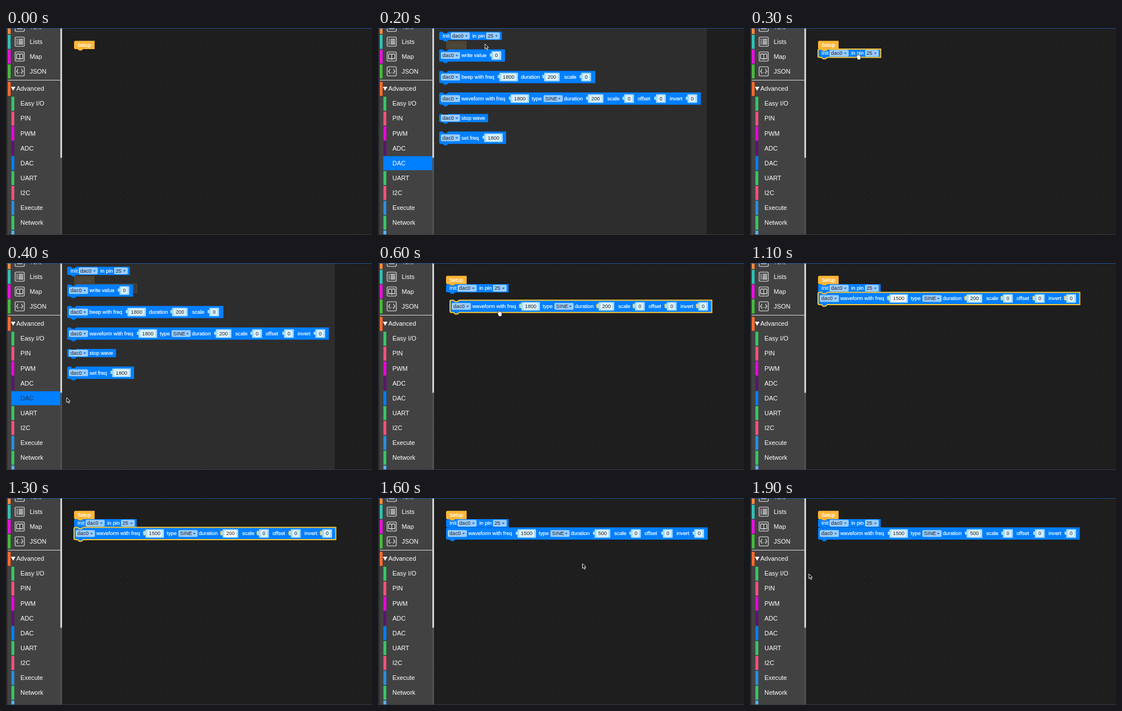
Write an HTML page that moves like this. It is 640x363 px and loops after 2 s.

```html
<!DOCTYPE html>
<html lang="en">
<head>
<meta charset="utf-8">
<title>Block editor</title>
<style>
  html, body { margin: 0; width: 100%; height: 100%; overflow: hidden; background: #1e1e1e; }
  svg { display: block; width: 100%; height: 100%; }
  text { font: 9.15px "Liberation Sans", Arial, sans-serif; white-space: pre; }
  .menu text { font-size: 10.9px; fill: #fff; }
  .label { fill: #fff; stroke: #fff; stroke-width: .2px; }
  .field { fill: #222; }
  .icon { fill: none; stroke: #eee; stroke-width: 1.1; }
</style>
</head>
<body>
<svg id="stage" viewBox="0 0 640 363" preserveAspectRatio="none">
  <defs>
    <pattern id="dots" x="119" y="10" width="11.6" height="11.6" patternUnits="userSpaceOnUse">
      <rect width="1" height="1" fill="#2e2e2e"/>
    </pattern>
  </defs>
  <rect width="640" height="363" fill="#1e1e1e"/>
  <rect x="98" width="542" height="363" fill="url(#dots)"/>
  <g id="workspace"></g>
  <g id="flyout">
    <rect x="98" width="477" height="363" fill="#303030" opacity=".86"/>
  </g>
  <g id="menu" class="menu"></g>
  <rect width="640" height="1" fill="#1c4f96"/>
  <rect y="362" width="640" height="1" fill="#333b44"/>
  <g id="pointer"></g>
</svg>
<script>
const $ = id => document.getElementById(id);
const BLUE = '#007fff', AMBER = '#fdb737', SELECT = '#f6c433';
const CHAR = 5.09;

const rect = (x, y, w, h, fill, extra = '') =>
  `<rect x="${x}" y="${y}" width="${w}" height="${h}" fill="${fill}" ${extra}/>`;
const text = (x, y, value, attrs = '') => `<text x="${x}" y="${y}" ${attrs}>${value}</text>`;

// Block parts; x is relative to the block, y to its middle line
const label = (x, value) => text(x, 3.1, value, 'class="label"');

function choice(x, value) {
  const w = { dac0: 33.5, SINE: 33.5, 25: 24 }[value], a = x + w - 6;
  return rect(x, -6, w, 12, '#99ccff', 'rx="2"') + text(x + 2.8, 3.1, value, 'class="field"') +
    `<path d="M${a - 2} -1h4.4l-2.2 2.8z" fill="#0a66c8"/>`;
}

function number(mid, value, selected, editing) {
  const w = value.length * CHAR + 12, x = mid - w / 2;
  const tab = `M${x + 1} -4c-1 2-4-1.5-4 2v2.5c0 3.5 3 0 4 2z`;
  return (selected ? `<path d="${tab}" fill="none" stroke="${SELECT}" stroke-width="2.6"/>` : '') +
    `<path d="${tab}" fill="#a6dcff"/>` + rect(x, -7.5, w, 15, '#a6dcff', 'rx="1"') +
    rect(x + 3, -5.7, w - 6, 11.4, editing ? '#fff' : '#dcf2fd', `rx="${editing ? 0 : 2}"`) +
    text(mid, 3.1, value, 'class="field" text-anchor="middle"');
}

function block(x, mid, w, h, parts, { fill = BLUE, selected = false, hat = false } = {}) {
  const notch = hat ? '' : 'H6l3 2.6h4l3-2.6';
  const d = `M0 2.5q0-2.5 2.5-2.5${notch}H${w}V${h}H16l-3 2.6h-4l-3-2.6H2.5q-2.5 0-2.5-2.5z`;
  const edge = selected ? `stroke="${SELECT}" stroke-width="2"` : '';
  return `<g transform="translate(${x} ${mid})">
    <path transform="translate(0 ${-h / 2})" d="${d}" fill="${fill}" ${edge}/>${parts}</g>`;
}

const setup = () => block(119, 29.7, 36, 14.6, label(6, 'Setup'), { fill: AMBER, hat: true });

const init = (x, mid, selected) => block(x, mid, 109.5, 14.4,
  label(6, 'Init') + choice(20, 'dac0') + label(58, 'in pin') + choice(82, '25'), { selected });

function wave(x, mid, { freq = '1800', time = '200', selected = false, edit = '' } = {}) {
  const num = (at, value, name) => number(at, value, selected, name && edit === name);
  return block(x, mid, 457.6, 21.6,
    choice(3, 'dac0') + label(39, 'waveform with freq') + num(141, freq, 'freq') +
    label(162, 'type') + choice(182.5, 'SINE') + label(218, 'duration') + num(273.5, time, 'time') +
    label(294, 'scale') + num(332, '0') + label(347, 'offset') + num(387.7, '0') +
    label(403, 'invert') + num(442.6, '0'), { selected });
}

const command = (mid, w, h, ...parts) => block(107, mid, w, h, choice(3, 'dac0') + parts.join(''));

$('flyout').innerHTML += init(107, 13.7) +
  command(48.2, 115, 21.6, label(39, 'write value'), number(100, '0')) +
  command(86, 273, 21.6, label(39, 'beep with freq'), number(121.5, '1800'),
    label(143, 'duration'), number(197, '200'), label(218.5, 'scale'), number(257, '0')) +
  wave(107, 123.8) +
  command(158, 85.5, 14.4, label(39, 'stop wave')) +
  command(192.4, 117, 21.6, label(39, 'set freq'), number(95, '1800'));

// Side menu
const icons = {
  Text: '<path d="M19 -2h10M19 1.5h10"/>',
  Lists: '<path d="M18.5 20h2M22 20h8M18.5 22.7h2M22 22.7h8M18.5 25.4h2M22 25.4h8M18.5 28.1h2M22 28.1h8" stroke-width="1.5"/>',
  Map: '<path d="M24 46.5q-3-2-5.5-.5v8q3-1 5.5.8q2.500-1.800 5.500-.8v-8q-2.500-1.500-5.500.5zv8"/>',
  JSON: '<path d="M21.500 72q-1.500 0-1.500 1.500t-1.500 2.500q1.500 1 1.500 2.500t1.500 1.500M26.500 72q1.500 0 1.500 1.500t1.500 2.500q-1.500 1-1.500 2.500t-1.500 1.500M22 78h1M24 78h1M26 78h.6"/>'
};
const topRows = [['Text', '#ff8a3d'], ['Lists', '#2fc0b4'], ['Map', '#ea0fe0'], ['JSON', '#46b93c']];
const subRows = [['Easy I/O', '#3ac566'], ['PIN', '#f2527f'], ['PWM', '#f000e0'], ['ADC', '#5a1470'],
  ['DAC', BLUE], ['UART', '#3ac566'], ['I2C', '#f2527f'], ['Execute', '#2b8fe0'],
  ['Network', '#3ac566'], ['', '#5bb3ff']];

let menu = rect(0, 0, 98, 363, '#424242') + rect(0, 0, 2.5, 363, '#2b2b2b') + rect(95, 0, 3, 363, '#505050') +
  rect(95, 0, 3, 227.5, '#d2d2d2');
topRows.forEach(([name, color], i) => {
  const mid = -2 + i * 26;
  menu += rect(3, mid - 12, 5, 24.5, color) + text(41.5, mid + 3.8, name) +
    `<g class="icon"><rect x="16" y="${mid - 8}" width="16" height="16" rx="1.5"/>${icons[name]}</g>`;
});
menu += rect(3, 91, 92, 1, '#d8d8d8') + rect(3, 94.5, 5, 24.5, '#ff6a2b') +
  '<path d="M8.5 103h8l-4 7z" fill="#fff"/>' + text(18, 110.1, 'Advanced');
subRows.forEach(([name, color], i) => {
  const mid = 132.5 + i * 26.1;
  if (name === 'DAC') menu += rect(9.5, mid - 12, 85.500, 24.5, BLUE, 'id="active"');
  menu += rect(9.5, mid - 12, 5, 24.5, color) +
    text(25.3, mid + 3.8, name, name === 'DAC' ? 'id="dac"' : '');
});
$('menu').innerHTML = menu;

const cursors = {
  arrow: '<path d="M0 0v8.500l2-1.800 1.500 3.200 1.500-.7-1.500-3h2.700z" fill="#111" stroke="#fff" stroke-width=".9"/>',
  hand: '<path d="M-2 1q-1-2 .3-2.300l1.400 1.600v-3.500q.8-1 1.600 0v1.700q.9-.7 1.500.2q1-.5 1.500.4q1-.2 1.200.7v3q0 2-1.200 3.700h-4z" fill="#fff" stroke="#222" stroke-width=".7"/>'
};

// One entry per 100 ms
const at = (x, y, kind = 'arrow') => ({ x, y, kind });
const waveAt = (x, mid, options) => ({ x, mid, options });
const placed = options => waveAt(119, 62.3, options);
const picked = { selected: true };
const freqEdit = { selected: true, edit: 'freq' };
const timeEdit = { selected: true, edit: 'time', freq: '1500' };
const done = placed({ freq: '1500', time: '500' });
const steps = [
  {},
  { open: 'dark', cursor: at(106, 236) },
  { open: 'light', cursor: at(187, 28) },
  { init: 2, cursor: at(188, 49, 'hand') },
  { init: 2, open: 'dark', cursor: at(106, 236) },
  { init: 2, open: 'light', cursor: at(188, 126) },
  { init: 1, wave: waveAt(126, 76, picked), cursor: at(211, 87, 'hand') },
  { init: 1, wave: placed(picked), cursor: at(205, 74, 'hand') },
  { init: 1, wave: placed(picked), cursor: at(240, 66, 'hand') },
  { init: 1, wave: placed(freqEdit) },
  { init: 1, wave: placed({ ...freqEdit, freq: '1500' }) },
  { init: 1, wave: placed({ ...freqEdit, freq: '1500' }) },
  { init: 1, wave: placed({ ...picked, freq: '1500' }), cursor: at(380, 67, 'hand') },
  { init: 1, wave: placed(timeEdit) },
  { init: 1, wave: placed({ ...timeEdit, time: '500' }) },
  { init: 1, wave: done, cursor: at(358, 115) },
  { init: 1, wave: done, cursor: at(357.5, 115) },
  { init: 1, wave: done, cursor: at(300, 121) },
  { init: 1, wave: done, cursor: at(190, 128) },
  { init: 1, wave: done, cursor: at(103, 133) }
];

function show({ init: initState, wave: w, open, cursor }) {
  $('workspace').innerHTML = (initState ? init(119, 44.2, initState === 2) : '') +
    setup() + (w ? wave(w.x, w.mid, w.options) : '');
  $('flyout').style.display = $('active').style.display = open ? '' : 'none';
  $('dac').style.fill = open === 'dark' ? '#1d3554' : '#fff';
  $('pointer').innerHTML = cursor
    ? `<g transform="translate(${cursor.x} ${cursor.y})">${cursors[cursor.kind]}</g>` : '';
}

let shown = -1;
const start = performance.now();
function tick() {
  const step = Math.floor((performance.now() - start) % 2000 / 100);
  if (step !== shown) show(steps[shown = step]);
  requestAnimationFrame(tick);
}
tick();
</script>
</body>
</html>
```
